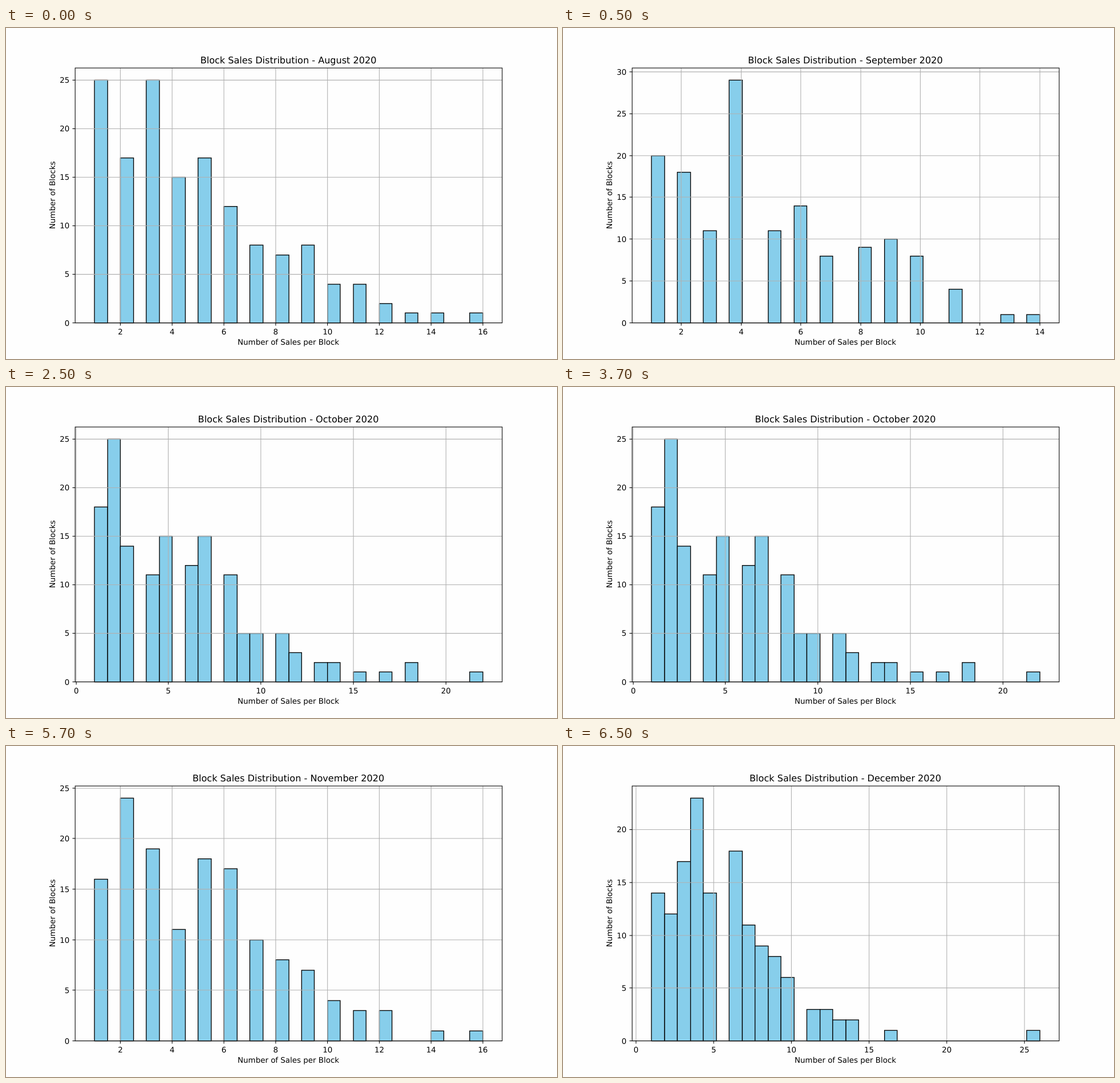
These frames come from a looping animation (966 px wide and 580 px high, 8000 ms). An HTML page:

```html
<!DOCTYPE html>
<html lang="en">
<head>
<meta charset="utf-8">
<title>Block Sales Distribution</title>
<style>
  html, body { margin: 0; width: 100%; height: 100%; overflow: hidden; background: #fefefe; }
  svg { display: block; font: 13.89px "DejaVu Sans", sans-serif; }
  text { text-anchor: middle; text-rendering: geometricPrecision; }
  .title { font-size: 16.67px; }
  .end { text-anchor: end; }
  .bar { fill: #87ceeb; stroke: #000; stroke-width: 1.39; }
  .grid { stroke: #b0b0b0; stroke-width: 1.11; }
  .axis { fill: none; stroke: #000; stroke-width: 1.11; }
</style>
</head>
<body>
<svg id="chart" width="966" height="580" viewBox="0 0 1000 600" preserveAspectRatio="none"></svg>
<script>
const BINS = 30, HOLD = 2000, LOOP = 8000, LEAD = 1500;

// counts[i]: blocks with i + 1 sales; one more block always sits alone at max
const months = [
  { name: "August", max: 16, counts: [25, 17, 25, 15, 17, 12, 8, 7, 8, 4, 4, 2, 1, 1] },
  { name: "September", max: 14, counts: [20, 18, 11, 29, 11, 14, 8, 9, 10, 8, 4, 0, 1] },
  { name: "October", max: 22, counts: [18, 25, 14, 11, 15, 12, 15, 11, 5, 5, 5, 3, 2, 2, 1, 0, 1, 2] },
  { name: "November", max: 16, counts: [16, 24, 19, 11, 18, 17, 10, 8, 7, 4, 3, 3, 0, 1] },
  { name: "December", max: 26, counts: [14, 12, 17, 23, 14, 18, 11, 9, 8, 6, 3, 3, 2, 2, 0, 1] }
];

const snap = v => Math.round(v) + 0.5;
const L = snap(125), R = snap(900), T = snap(72), B = snap(534), TICK = 4.86;

const line = (cls, x1, y1, x2, y2) =>
  `<path class="${cls}" d="M${x1} ${y1}L${x2} ${y2}"/>`;
const box = (cls, x1, y1, x2, y2) =>
  `<rect class="${cls}" x="${x1}" y="${y1}" width="${x2 - x1}" height="${y2 - y1}"/>`;
const label = (s, x, y, attrs = "") => `<text x="${x}" y="${y}" ${attrs}>${s}</text>`;

function draw({ name, max, counts }) {
  const span = max - 1, low = 1 - span * 0.05, high = max + span * 0.05;
  const top = Math.max(...counts) * 1.05;
  const step = max > 16 ? 5 : 2;
  const X = v => snap(125 + 775 * (v - low) / (high - low));
  const Y = v => snap(534 - 462 * v / top);
  const edge = bin => X(1 + span * bin / BINS);

  let bars = line("bar", edge(0), B, edge(BINS), B), grid = "", axes = "", labels = "";

  const addBar = (sales, n) => {
    const bin = Math.min(Math.floor((sales - 1) * BINS / span), BINS - 1);
    if (n) bars += box("bar", edge(bin), Y(n), edge(bin + 1), B);
  };
  counts.forEach((n, i) => addBar(i + 1, n));
  addBar(max, 1);

  for (let v = Math.ceil(low / step) * step; v <= high; v += step) {
    const x = X(v);
    grid += line("grid", x, T, x, B);
    axes += line("axis", x, B, x, B + TICK);
    labels += label(v, x, 555);
  }
  for (let v = 0; v <= top; v += 5) {
    const y = Y(v);
    grid += line("grid", L, y, R, y);
    axes += line("axis", L - TICK, y, L, y);
    labels += label(v, 115.3, y + 5, 'class="end"');
  }

  axes += box("axis", L, T, R, B);
  labels += label(`Block Sales Distribution - ${name} 2020`, 512.5, 64, 'class="title"')
    + label("Number of Sales per Block", 512.5, 574.2)
    + label("Number of Blocks", 0, 0, 'transform="translate(88.8 303) rotate(-90)"');

  chart.innerHTML = bars + grid + axes + labels;
}

const chart = document.getElementById("chart");
let shown;

function frame(now) {
  const month = months[Math.floor((now % LOOP + LEAD) / HOLD)];
  if (month !== shown) draw(shown = month);
  requestAnimationFrame(frame);
}
frame(0);
</script>
</body>
</html>
```
